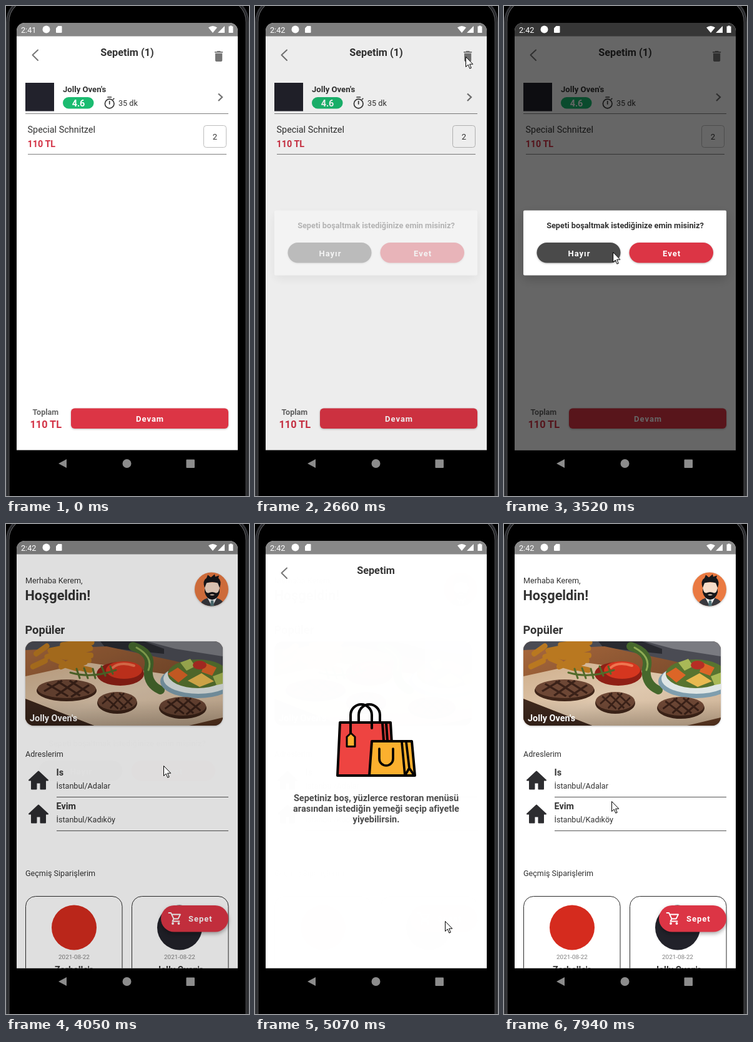
Write an HTML page that moves like this. It is 389 px wide and 785 px high and loops after 8 s.

```html
<!DOCTYPE html>
<html lang="tr">
<head>
<meta charset="utf-8">
<title>Sepetim</title>
<style>
html, body { margin: 0; width: 100%; height: 100%; overflow: hidden; background: #000; }
svg { display: block; width: 389px; height: 785px; }
text { font: 12.6px Roboto, sans-serif; fill: #333; white-space: pre; }
.b { font-weight: 700; }
.mid { text-anchor: middle; }
.s10 { font-size: 9.9px; }
.s13 { font-size: 13.1px; }
.s14 { font-size: 14.4px; }
.s16 { font-size: 16.3px; }
.s18 { font-size: 18.2px; }
.s22 { font-size: 21.7px; }
.red { fill: #d33245; }
.soft { fill: #666; }
.pale { fill: #808080; }
.white { fill: #fff; }
.btn { font-size: 13px; font-weight: 700; letter-spacing: 1px; fill: #fff; }
.line { fill: none; stroke-linecap: round; stroke-linejoin: round; }
.lift { filter: drop-shadow(0 1px 1.5px #0004); }

#home, #empty, #scrim, #dialog, #cursor, #before, #after, #bin { animation: 8s linear infinite; }
#home { animation-name: home; }
#empty { animation-name: empty; }
#scrim { animation-name: scrim; }
#dialog { animation-name: dialog; }
#cursor { animation-name: cursor; }
#bin { animation-name: press; }
#before { animation-name: before; }
#after { animation-name: after; }

@keyframes before { 0%, 17.4% { opacity: 1 } 17.41%, 100% { opacity: 0 } }
@keyframes after { 0%, 17.4% { opacity: 0 } 17.41%, 100% { opacity: 1 } }
@keyframes press { 0%, 30% { opacity: 1 } 30.8%, 31.3% { opacity: .5 } 33%, 100% { opacity: 1 } }
@keyframes home { 0%, 49.2% { opacity: 0 } 49.21%, 100% { opacity: 1 } }
@keyframes empty {
  0%, 60.3% { opacity: 0 } 62% { opacity: .7 } 63.3% { opacity: .995 }
  64.2%, 86.4% { opacity: 1 } 88.4% { opacity: .4 } 90.2%, 100% { opacity: 0 }
}
@keyframes scrim {
  0%, 32.2% { opacity: 0 } 33.25% { opacity: .067 } 37.3%, 48.8% { opacity: .6 }
  50.6% { opacity: .13 } 51.5%, 100% { opacity: 0 }
}
@keyframes dialog {
  0%, 32.2% { opacity: 0 } 33.25% { opacity: .31 } 35.8%, 48.8% { opacity: 1 }
  50.6% { opacity: .01 } 51.2%, 100% { opacity: 0 }
}
@keyframes cursor {
  0%, 1.6% { transform: translate(274px, 787px) }
  1.7% { transform: translate(274px, 770px) }
  5% { transform: translate(315px, 560px) }
  8.37%, 12.4% { transform: translate(340px, 395px) }
  13.4% { transform: translate(346px, 407px) }
  17.5% { transform: translate(345px, 260px) }
  22.5% { transform: translate(342px, 140px) }
  27.5%, 40.5% { transform: translate(337px, 81px) }
  42.4% { transform: translate(268px, 235px) }
  44% { transform: translate(174px, 394px) }
  45% { transform: translate(180px, 396px) }
  47.2% { transform: translate(245px, 389px) }
  48%, 54.6% { transform: translate(252px, 387px) }
  57.5% { transform: translate(285px, 540px) }
  59.4%, 63.4% { transform: translate(304px, 636px) }
  64.25% { transform: translate(300px, 620px) }
  67.6%, 69.9% { transform: translate(287px, 478px) }
  71.9% { transform: translate(303px, 508px) }
  75% { transform: translate(210px, 440px) }
  79.5% { transform: translate(77px, 268px) }
  81.1% { transform: translate(114px, 149px) }
  83% { transform: translate(60px, 92px) }
  84%, 86.2% { transform: translate(43px, 78px) }
  90.2% { transform: translate(180px, 139px) }
  93.1% { transform: translate(284px, 240px) }
  96.2% { transform: translate(225px, 390px) }
  98.4% { transform: translate(167px, 440px) }
  99.2%, 100% { transform: translate(172px, 444px) }
}
</style>
</head>
<body>
<svg viewBox="0 0 389 785">
  <defs>
    <clipPath id="screen"><path d="M17 711.500V40a13 13 0 0 1 13-13H358a13 13 0 0 1 13 13V711.500z"/></clipPath>
    <clipPath id="photo"><rect width="316" height="135" rx="14"/></clipPath>
    <clipPath id="face"><circle r="27"/></clipPath>
    <linearGradient id="paper" x2="1" y2="1">
      <stop stop-color="#cfae8b"/><stop offset=".5" stop-color="#dfc8ae"/><stop offset="1" stop-color="#cbb093"/>
    </linearGradient>
    <linearGradient id="wood" x2="1" y2="1">
      <stop stop-color="#a8683c"/><stop offset="1" stop-color="#5d3822"/>
    </linearGradient>
    <linearGradient id="shade" x2="0" y2="1">
      <stop offset=".7" stop-opacity="0"/><stop offset="1" stop-opacity=".2"/>
    </linearGradient>
    <path id="house" d="M16 1 31 15H27V29H19.500V19H12.500V29H5V15H1z" fill="#2d2d30" stroke="#2d2d30" stroke-width="2" stroke-linejoin="round"/>
    <path id="back" class="line" d="M51 70.500 42.500 78.500 51 87" stroke="#777" stroke-width="2"/>
    <g id="steak">
      <ellipse rx="40" ry="17" cy="3" fill="#3f2519"/>
      <ellipse rx="39" ry="15" fill="#6d4735"/>
      <path d="M-26-8 2 12M-12-12 18 11M4-13 30 7M-30 4-6-13M-14 11 14-13M6 13 30-6" stroke="#3a2118" stroke-width="3"/>
    </g>
  </defs>

  <!-- phone body -->
  <rect width="389" height="785"/>
  <g fill="none">
    <rect x="1.500" y="-14" width="386" height="850" rx="40" stroke="#35363a" stroke-width="3"/>
    <rect x="4.500" y="-11" width="380" height="850" rx="37" stroke="#58595c" stroke-width="1.500"/>
  </g>
  <g fill="#8c8c8c">
    <path d="M97 726V740L84 733z"/><circle cx="193.500" cy="733" r="7"/><rect x="288.500" y="726.500" width="13.500" height="13.500" rx="1"/>
  </g>

  <g clip-path="url(#screen)">
    <!-- basket -->
    <g id="cart">
      <rect x="17" y="27" width="354" height="685" fill="#fff"/>
      <use href="#back"/>
      <text class="b s16 mid" x="194" y="80">Sepetim (1)</text>
      <path id="bin" transform="translate(329.300 69.200) scale(.94)" fill="#757575" d="M6 19c0 1.100.9 2 2 2h8c1.100 0 2-.9 2-2V7H6zM19 4h-3.500l-1-1h-5l-1 1H5v2h14z"/>
      <rect x="31" y="123" width="46" height="45.500" fill="#22222c"/>
      <text class="b s13" x="91" y="137.500">Jolly Oven's</text>
      <rect x="91" y="146" width="49.500" height="18.500" rx="9.200" fill="#1bbb70"/>
      <text class="b s14 white mid" x="116" y="160.500">4.6</text>
      <g class="line" stroke="#3a3a3a" stroke-width="1.700">
        <circle cx="165.700" cy="156.500" r="7.300"/><path d="M163 146H168.500M165.700 152.500V157M171.500 149.500 172.800 148.300"/>
      </g>
      <text x="180" y="160">35 dk</text>
      <path d="M340 140.500 346 146 340 152" fill="none" stroke="#757575" stroke-width="2.300"/>
      <path d="M31 172.500H356M35 237.500H353" stroke="#808080"/>
      <text class="s14" x="34.500" y="203">Special Schnitzel</text>
      <text class="b s14 red" x="34.500" y="226">110 TL</text>
      <rect x="316.500" y="191.500" width="36" height="35" rx="4" fill="#fff" stroke="#bdbdbd"/>
      <text class="s13 mid" x="334.500" y="214">2</text>
      <text class="b soft" x="42.500" y="655">Toplam</text>
      <text class="b s16 red" x="38.500" y="676">110 TL</text>
      <rect class="lift" x="104" y="644.500" width="252" height="32.500" rx="6" fill="#dc3545"/>
      <text class="btn" x="208" y="666">Devam</text>
    </g>

    <!-- home -->
    <g id="home">
      <rect x="17" y="27" width="354" height="685" fill="#fff"/>
      <text x="31" y="95">Merhaba Kerem,</text>
      <text class="b s22" x="30.500" y="121.500">Hoşgeldin!</text>
      <circle class="lift" cx="329" cy="104.500" r="27" fill="#ea7a42"/>
      <g transform="translate(329 104.500)"><g clip-path="url(#face)">
        <path d="M-19 28Q-18 17-6 14H8Q20 17 21 28z" fill="#38383e"/>
        <path d="M-7 13 1 28 9 13z" fill="#f4f4f4"/>
        <path d="M-1 18H3L4 28H-2z" fill="#52747a"/>
        <path d="M-11-11H13V3Q11 14 1 14-9 14-11 3z" fill="#f7ddc9"/>
        <path d="M-11-2Q-9 7-5 6 1 3 7 6 11 7 13-2V5Q10 16 1 17-8 16-11 5zM-3 9Q1 7 5 9 1 11-3 9z" fill="#17171a" fill-rule="evenodd"/>
        <path d="M-11-2Q-15-14-8-18L-6-23-1-19 5-24 6-20 12-22 11-18Q17-13 13-2L10-10Q1-13-8-10z" fill="#17171a"/>
      </g></g>
      <text class="b s18" x="30.500" y="176">Popüler</text>
      <rect class="lift" x="31" y="188" width="316" height="135" rx="14" fill="#997251"/>
      <g transform="translate(31 188)"><g clip-path="url(#photo)">
        <rect width="316" height="135" fill="#4a4b53"/>
        <path d="M195 0H316V24L240 12z" fill="#7a7b81"/>
        <path d="M120 0H190L222 12V20L128 10z" fill="#292a30"/>
        <path d="M0 14 130 8 316 48V135H0z" fill="url(#wood)"/>
        <path d="M0 56 100 34 316 66V122L262 135H110L0 92z" fill="url(#paper)"/>
        <path d="M0 92 110 135H0z" fill="#3e281d"/>
        <path id="fries" class="line" stroke="#b97820" stroke-width="8"/>
        <use href="#fries" style="stroke: #f2bf42; stroke-width: 5px" transform="translate(0 -1)"/>
        <ellipse cx="152" cy="52" rx="38" ry="19" fill="#8f2016"/>
        <ellipse cx="158" cy="46" rx="29" ry="14" fill="#d5361f"/>
        <path d="M140 42Q152 32 174 39" class="line" stroke="#ef7650" stroke-width="4"/>
        <path class="line" d="M172 8Q204 18 197 43 194 68 216 78" stroke="#46682c" stroke-width="14"/>
        <path class="line" d="M178 10Q205 25 197 46" stroke="#8fab54" stroke-width="3"/>
        <path class="line" d="M72 50Q105 60 145 46M82 44l5 15M94 43l6 16M108 44l4 15M122 40l6 15M136 40l4 12" stroke="#526b2b" stroke-width="3"/>
        <ellipse cx="276" cy="64" rx="60" ry="27" fill="#7f9eae"/>
        <ellipse cx="277" cy="60" rx="56" ry="24" fill="#dfe6e5"/>
        <ellipse cx="276" cy="52" rx="48" ry="23" fill="#587430"/>
        <path d="M228 52 244 42 260 54 245 66zM287 34 306 42 299 55 282 49z" fill="#dc6527"/>
        <path d="M260 63 282 51 302 64 279 73z" fill="#e9b950"/>
        <path d="M248 34 264 28 272 40 258 47zM300 56 316 50V68L306 70z" fill="#a9b957"/>
        <ellipse cx="279" cy="38" rx="11" ry="7" fill="#b72e24"/>
        <use href="#steak" transform="translate(66 76) scale(1.200 1)"/>
        <use href="#steak" transform="translate(147 96) scale(.8 1)"/>
        <use href="#steak" transform="translate(252 104) scale(.95 1)"/>
        <rect width="316" height="135" fill="url(#shade)"/>
      </g></g>
      <text class="b s14 white" x="38" y="315.500">Jolly Oven's</text>
      <text x="31" y="373">Adreslerim</text>
      <use href="#house" x="36" y="395.500"/>
      <text class="b s14" x="80.500" y="403">Is</text>
      <text x="80.500" y="424">İstanbul/Adalar</text>
      <use href="#house" x="36" y="449.500"/>
      <text class="b s14" x="80.500" y="457">Evim</text>
      <text x="80.500" y="478">İstanbul/Kadıköy</text>
      <path d="M81 437.500H356M81 491.500H356" stroke="#555"/>
      <text x="31" y="564">Geçmiş Siparişlerim</text>
      <g fill="#fff" stroke="#2b2b2b">
        <rect x="31.500" y="596.500" width="154.500" height="150" rx="16"/><rect x="201.500" y="596.500" width="154.500" height="150" rx="16"/>
      </g>
      <circle cx="109" cy="646.500" r="36" fill="#d52b1e"/>
      <circle cx="278" cy="646.500" r="36" fill="#22222a"/>
      <text class="s10 mid pale" x="109" y="696.500">2021-08-22</text>
      <text class="s10 mid pale" x="278" y="696.500">2021-08-22</text>
      <text class="b s14 mid" x="109" y="718.500">Zorbello's</text>
      <text class="b s14 mid" x="278" y="718.500">Jolly Oven's</text>
      <rect x="248" y="611" width="108" height="42.500" rx="21.200" fill="#dc3545" style="filter: drop-shadow(0 3px 3px #0005)"/>
      <g class="line" stroke="#fff" stroke-width="1.800">
        <path d="M260.500 623H264L268.500 632.500H275.500L279 625.500H265.500M268.500 632.500 266.500 636.500H277.500"/>
        <circle cx="267" cy="640" r="1"/><circle cx="276.500" cy="640" r="1"/>
      </g>
      <text class="btn" x="292" y="637">Sepet</text>
    </g>

    <!-- empty basket -->
    <g id="empty">
      <rect x="17" y="27" width="354" height="685" fill="#fff"/>
      <use href="#back"/>
      <text class="b s16 mid" x="193.500" y="80">Sepetim</text>
      <g class="line" stroke="#000" stroke-width="4">
        <path d="M136 318H217L222 403H132z" fill="#ee4340"/>
        <path d="M204 319 206 347M210 319 212 347"/>
        <path d="M166 317V306a17 17 0 0 1 34 0V317M153 336V306a17 17 0 0 1 34 0V327"/>
        <path d="M147 341 153.500 335 160 341V356.500H147z" fill="#fbb02d" stroke-width="3"/>
        <path d="M187 348H251L256 403H183z" fill="#fbb02d"/>
        <path d="M199 360V376a11 11 0 0 0 22 0V360M235 349 240 403 247 391 255 403M242 349 247 391" stroke-width="3.700"/>
      </g>
      <text class="b mid" style="font-size: 14.5px; fill: #4a4a4a"><tspan x="194" y="443.500">Sepetiniz boş, yüzlerce restoran menüsü</tspan><tspan x="194" y="460.500">arasından istediğin yemeği seçip afiyetle</tspan><tspan x="194" y="477.500">yiyebilirsin.</tspan></text>
    </g>

    <rect x="17" y="27" width="354" height="21.500" fill="#888"/>
    <rect id="scrim" x="17" y="27" width="354" height="685"/>

    <!-- status bar -->
    <g fill="#fff">
      <text id="before" class="white" x="24" y="42.500">2:41</text>
      <text id="after" class="white" x="24" y="42.500">2:42</text>
      <circle cx="64.500" cy="37.500" r="6"/>
      <path d="M83.500 32H88.500a1 1 0 0 1 1 1V42a1 1 0 0 1-1 1H81a1 1 0 0 1-1-1V35.500z"/>
      <path d="M324 34.500Q331 29.500 338 34.500L331 43zM350 32V43H339z"/>
      <path d="M358.500 32.500V31.500H361.500V32.500H363.500V43H356.500V32.500z"/>
    </g>

    <g id="dialog">
      <rect x="31" y="327.500" width="325" height="104" rx="2" fill="#fff" style="filter: drop-shadow(0 6px 9px #0003)"/>
      <text class="b mid" style="font-size: 12.75px" x="194" y="356">Sepeti boşaltmak istediğinize emin misiniz?</text>
      <rect class="lift" x="52.500" y="379" width="134" height="32.500" rx="16.200" fill="#4a4a4a"/>
      <rect class="lift" x="200.500" y="379" width="134.500" height="32.500" rx="16.200" fill="#dc3545"/>
      <text class="btn" x="102.500" y="401">Hayır</text>
      <text class="btn" x="254" y="401">Evet</text>
    </g>
  </g>

  <path id="cursor" d="M.5.5V16.500L4.200 13 6.800 19.200 9.200 18.200 6.600 12.200H11.800z" fill="#fff" stroke="#000"/>
</svg>
<script>
// Seeded scatter of fries on the plate
let seed = 7;
const rand = (lo, hi) => {
  seed = (seed * 16807) % 2147483647;
  return (lo + (hi - lo) * seed / 2147483647).toFixed(1);
};
document.getElementById('fries').setAttribute('d',
  Array.from({ length: 26 }, () => `M${rand(12, 80)} ${rand(4, 44)}l${rand(14, 34)} ${rand(-14, 9)}`).join(''));
</script>
</body>
</html>
```
